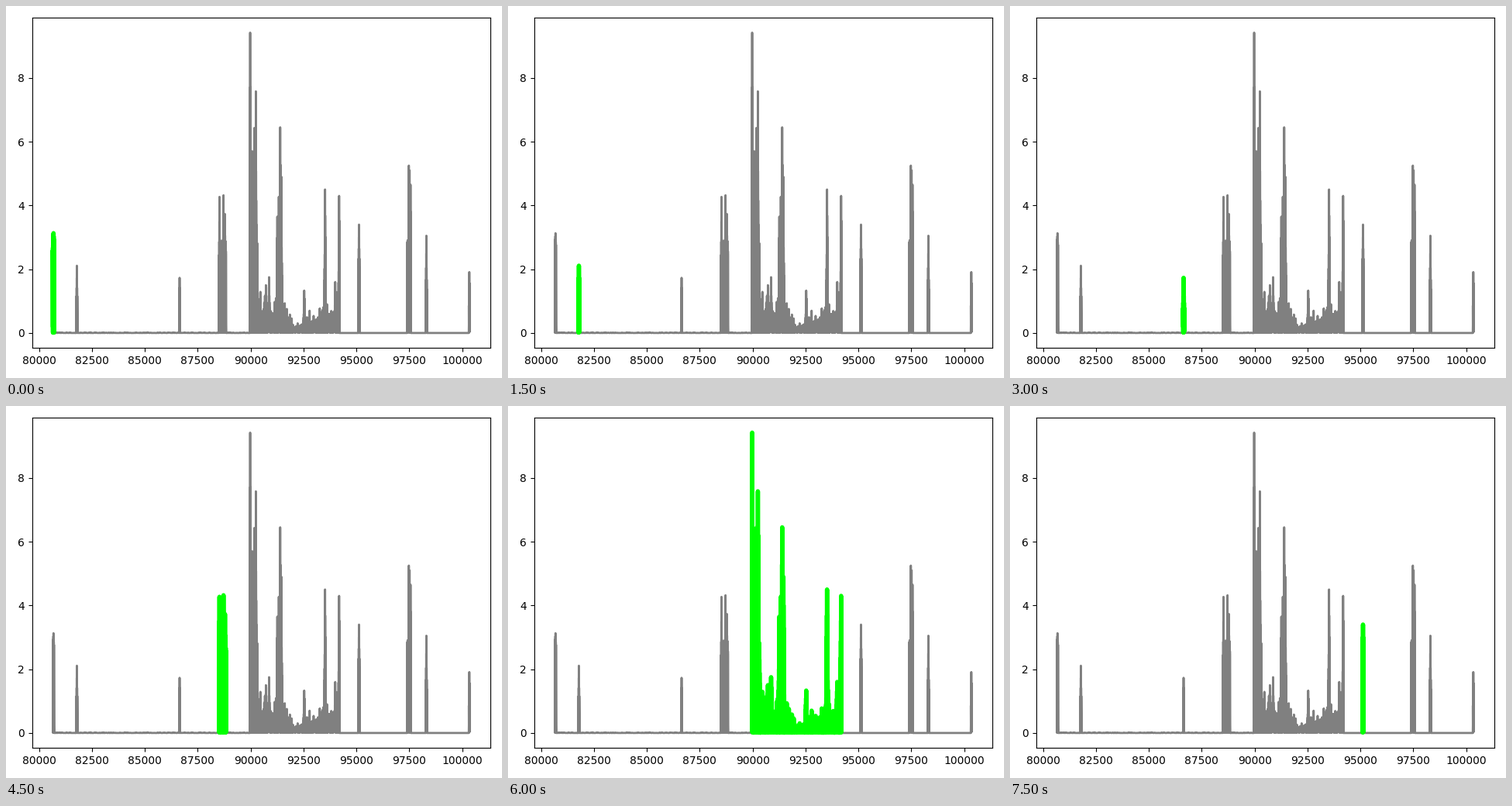
Animation, 640 px wide and 480 px high, one loop 8 s. Source, as a matplotlib script:

```python
import numpy as np
import matplotlib.pyplot as plt
from matplotlib.animation import FuncAnimation

rng = np.random.default_rng(7)
START, END = 80655, 100350
STEP_MS, HOLD = 500, 3


def burst(start, end, peaks, fade=25, floor=0):
    """Fast oscillation between near zero and an envelope of decaying peaks."""
    xs = np.arange(start, end + 1, 5)
    base = floor(xs) if callable(floor) else np.full(len(xs), float(floor))
    u, v, w = rng.random((3, len(xs)))
    top = base * (.55 + .5 * u) + 1.3 * np.minimum(base, .6) * v ** 30
    for center, height in peaks:
        top = np.maximum(top, height * np.exp(-abs(xs - center) / fade))
    low = .01 + .05 * w
    low[0] = .25
    ys = np.column_stack([low, top]).ravel()
    return np.append(np.repeat(xs, 2), end), np.append(ys, .25)


def pulse(center, height, fade=25):
    return burst(center - 20, center + 20, [(center, height)], fade)


def rest(x0, x1):
    """Flat stretch, with faint ripples in the first half."""
    xs = np.linspace(x0 + 5, x1 - 5, int((x1 - x0) / 25))
    return xs, np.where(xs < 89900, .02 * rng.random(len(xs)) ** 4, 0)


def valley(xs):
    return np.interp(xs, [90000, 91450, 92050, 93000, 94190],
                     [.7, .6, .18, .38, .7])


bursts = [
    burst(START, 80705, [(80685, 3.13)], fade=160),
    pulse(81790, 2.11),
    pulse(86645, 1.73),
    burst(88505, 88835, [(88530, 4.27), (88720, 4.32), (88790, 3.73)],
          floor=2.8),
    burst(89980, 94190,
          [(89980, 9.42), (90080, 5.7), (90180, 6.43), (90250, 7.58),
           (90315, 2.82), (90725, 1.5), (90875, 1.75), (91265, 3.65),
           (91335, 4.27), (91400, 6.45), (91455, 4.9), (92535, 1.33),
           (93520, 4.5), (94000, 1.6), (94185, 4.3)],
          floor=valley),
    pulse(95125, 3.4, fade=40),
    burst(97405, 97570, [(97480, 5.25), (97515, 5.1), (97560, 4.65)],
          floor=2.8),
    pulse(98310, 3.05),
    burst(100320, END, [(100340, 1.91)]),
]

parts = [bursts[0]]
for prev, cur in zip(bursts, bursts[1:]):
    parts += [rest(prev[0][-1], cur[0][0]), cur]
x, y = np.concatenate(parts, axis=1)

fig, ax = plt.subplots(figsize=(6.4, 4.8), dpi=100)
ax.plot(x, y, color="gray", lw=2)
marker, = ax.plot([], [], color="lime", lw=4)
pad_x, pad_y = .05 * (END - START), .05 * y.max()
ax.set_xlim(START - pad_x, END + pad_x)
ax.set_ylim(-pad_y, y.max() + pad_y)
fig.tight_layout()


def update(frame):
    marker.set_data(*bursts[frame // HOLD])
    return marker,


anim = FuncAnimation(fig, update, frames=16, interval=STEP_MS, repeat=True,
                     repeat_delay=0, blit=False)
plt.show()
```
